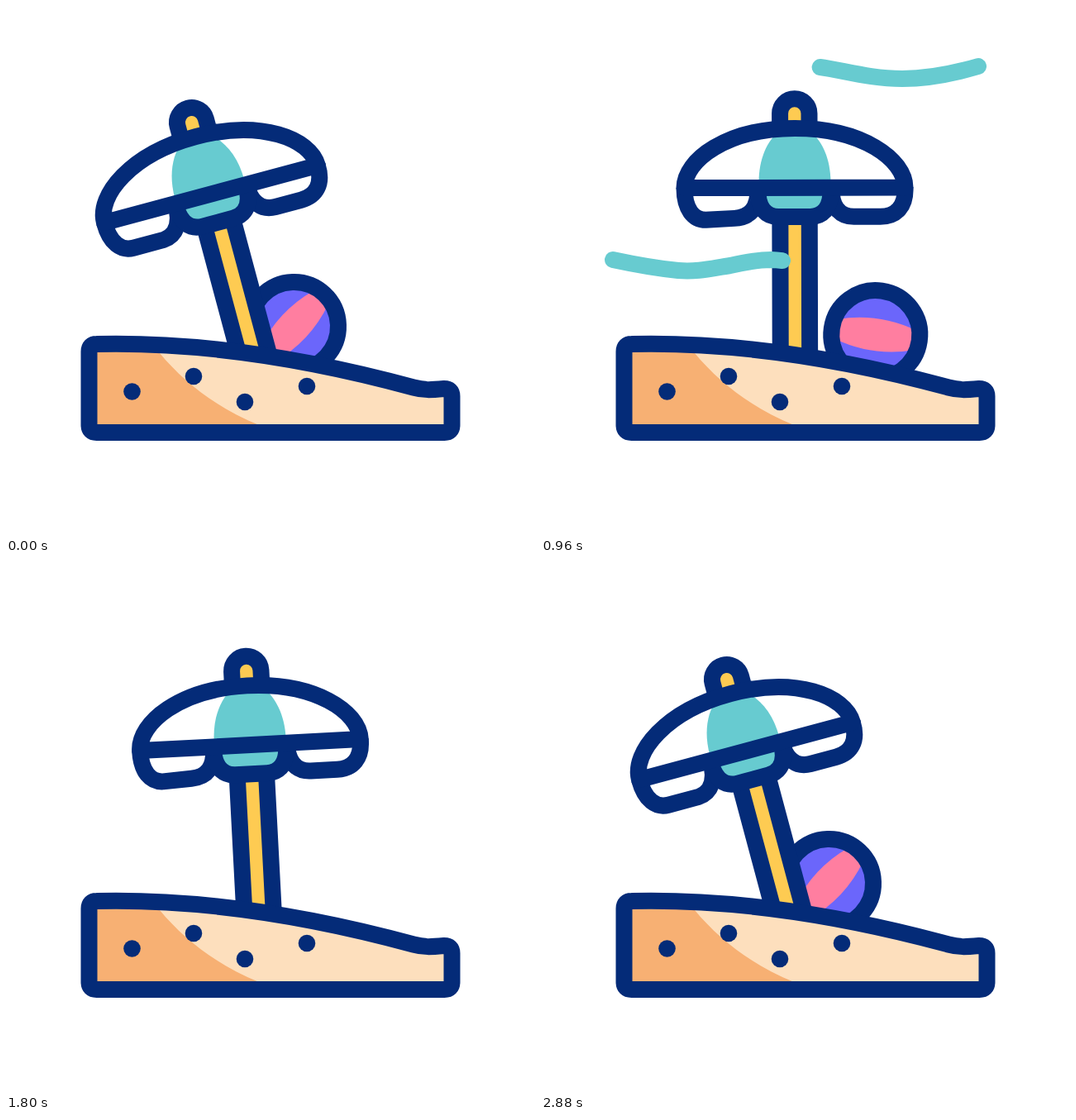
An HTML page for the animation above (3000 ms loop, 640x640 px).

```html
<!DOCTYPE html>
<html lang="en">
<head>
<meta charset="utf-8">
<title>Beach umbrella</title>
<style>
  html, body { margin: 0; width: 100%; height: 100%; overflow: hidden; background: #fff; }
  svg { display: block; width: 100%; height: 100%; }
  .line { stroke: #042b78; stroke-width: 20; stroke-linejoin: round; }
  .wind { fill: none; stroke: #67cbd0; stroke-width: 20; stroke-linecap: round; }
  .white { fill: #fff; }
  .teal { fill: #67cbd0; }
  .yellow { fill: #fecb52; }
  .navy { fill: #042b78; }
  .none { fill: none; }
</style>
</head>
<body>
<svg viewBox="0 0 640 640">
  <defs>
    <clipPath id="above"><rect width="640" height="512"/></clipPath>
    <clipPath id="disc"><circle r="50"/></clipPath>
    <path id="ground" d="M109.500 409C240 406 370 428 493 461.500C506 465 513 464.500 530 463Q539.500 463 539.500 472V507Q539.500 516 530.500 516H109.500Q100.500 516 100.500 507V418Q100.500 409 109.500 409Z"/>
    <clipPath id="inside"><use href="#ground"/></clipPath>
  </defs>

  <g clip-path="url(#above)">
    <g id="ball">
      <circle r="53.500" fill="#6b66fb"/>
      <path d="M-12 -48Q-27 0 -12 48H12Q27 0 12 -48Z" fill="#ff7ea0" clip-path="url(#disc)"/>
      <circle r="53.500" class="line none"/>
    </g>
  </g>

  <g id="umbrella">
    <path class="line yellow" d="M289.800 250V480H325.200V250Z"/>
    <path class="line yellow" d="M289.800 146V130A17.700 17.700 0 0 1 325.200 130V146"/>
    <path class="line white" id="leftFlap"/>
    <path class="line white" d="M441 219.800C442 243 430 255 411 255H379C362 255 352 243 352 222"/>
    <path class="line teal" d="M263 219.800V224C263 244 272 255 288 255H326C342 255 351 244 351 224V219.800"/>
    <path class="white" d="M174 219.800C174 186 226 148 307.500 148S441 186 441 219.800Z"/>
    <path class="teal" d="M264 214C264 185 274 163 290 150H325C341 163 351 185 351 214Z"/>
    <path class="line none" d="M174 219.800C174 186 226 148 307.500 148S441 186 441 219.800Z"/>
  </g>

  <use href="#ground" fill="#fddfbd"/>
  <path d="M100 400H170L186 420C215 455 255 486 306 507V520H100Z" fill="#f7b073" clip-path="url(#inside)"/>
  <use href="#ground" class="line none"/>
  <g class="navy">
    <circle cx="152.500" cy="466.500" r="10.300"/>
    <circle cx="227" cy="448" r="10.300"/>
    <circle cx="289" cy="479" r="10.300"/>
    <circle cx="364" cy="460" r="10.300"/>
  </g>

  <path class="wind" id="highWind" pathLength="1" d="M172 79C192 83 212 87 235 87C268 87 290 73 323 73C352 73 390 88 437 88C470 88 505 80 529 73"/>
  <path class="wind" id="lowWind" pathLength="1" d="M87 307C115 313 135 317 166 320C190 322 208 317 229 314C247 310 262 307 278 307C312 308 340 321 375 321C400 320 425 314 448 307"/>
</svg>

<script>
  const LOOP = 3000, STEP = 40;
  const get = id => document.getElementById(id);
  const ball = get('ball'), umbrella = get('umbrella'), leftFlap = get('leftFlap');
  const highWind = get('highWind'), lowWind = get('lowWind');

  const span = (t, from, to) => Math.min(1, Math.max(0, (t - from) / (to - from)));
  const smooth = u => u * u * (3 - 2 * u);
  const easeOut = (u, power) => 1 - (1 - u) ** power;

  function drawUmbrella(t) {
    const tilt = -15 + 15 * smooth(span(t, 240, 840))
      - 3 * smooth(span(t, 840, 1800))
      - 12 * smooth(span(t, 1800, 2200));
    umbrella.setAttribute('transform', `rotate(${tilt} 307 450)`);
    // The loose left flap lifts slightly once the wind catches it.
    const lift = 1.8 * span(tilt, -15, -3);
    const y = 258.5 - lift;
    leftFlap.setAttribute('d',
      `M174 219.8C174 246 185 258.500 200 258.500L${238 - lift * 2} ${y}C254 ${y - 1} 263 244 263 222`);
  }

  function ballAt(t) {
    if (t < 1700) {
      const u = Math.max(0, (t - 240) / 1240);
      const dx = 138 * u ** 2 + 148 * u ** 5;
      return { x: 348.5 + dx, y: Math.min(405.3, 387.5 + 0.18 * dx), turn: 43 + 0.98 * dx };
    }
    const dx = -94 * (1 - easeOut(span(t, 1800, 2720), 3));
    const y = 387.5 + 90 * (1 - easeOut(span(t, 1800, 2200), 2));
    return { x: 348.5 + dx, y, turn: 43 + 0.6 * dx };
  }

  function drawBall(t) {
    const { x, y, turn } = ballAt(t);
    ball.setAttribute('transform', `translate(${x} ${y}) rotate(${turn})`);
  }

  function drawWind(path, t) {
    const head = span(t, 220, 936) ** 1.285;
    const tail = easeOut(span(t, 720, 1320), 1.22);
    const length = head - tail;
    path.style.display = length > 0.001 ? '' : 'none';
    path.setAttribute('stroke-dasharray', `${length} 2`);
    path.setAttribute('stroke-dashoffset', -tail);
  }

  function draw(t) {
    drawUmbrella(t);
    drawBall(t);
    drawWind(highWind, t);
    drawWind(lowWind, t - 280);
  }

  const start = performance.now();
  function tick() {
    const t = (performance.now() - start) % LOOP;
    draw(Math.min(2880, Math.floor(t / STEP) * STEP));
    requestAnimationFrame(tick);
  }
  tick();
</script>
</body>
</html>
```
